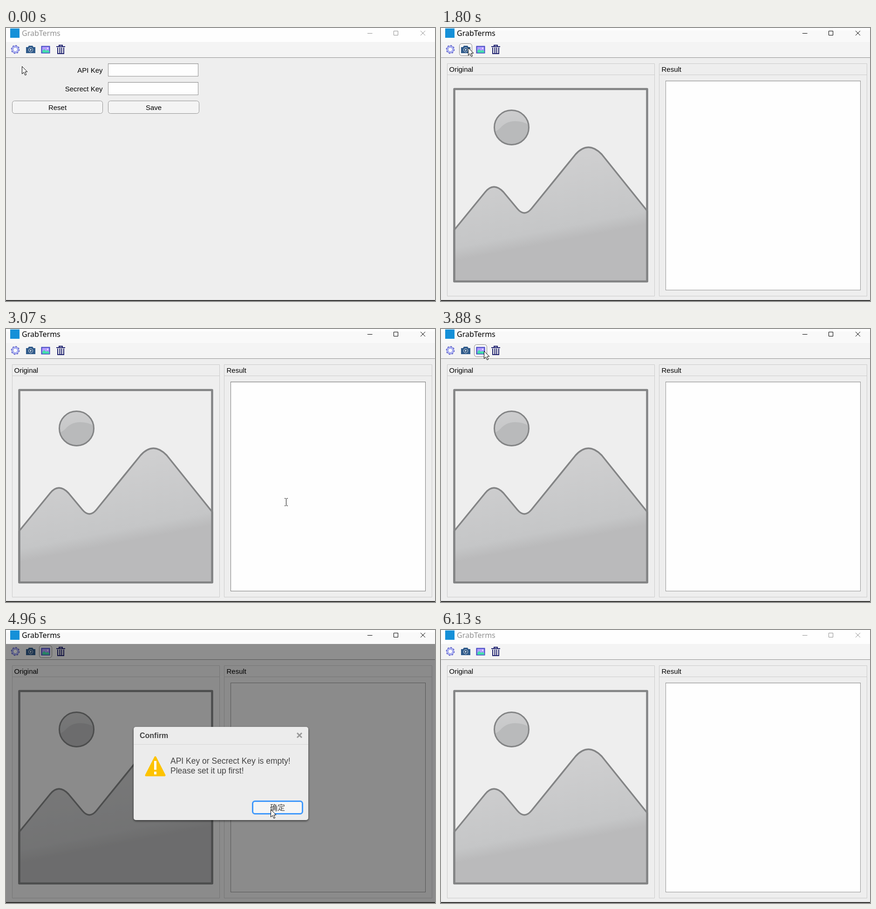
Animation of 921x586 px, one loop 6230 ms. Source, as an HTML page:

```html
<!DOCTYPE html>
<html lang="en">
<head>
<meta charset="utf-8">
<title>GrabTerms</title>
<style>
  html, body { margin: 0; width: 100%; height: 100%; overflow: hidden; background: #eee; }
  svg { position: fixed; inset: 0; width: 100%; height: 100%; font: 15px "Liberation Sans", Arial, sans-serif; }
  .right { text-anchor: end; }
  .center { text-anchor: middle; }
  .panel { fill: none; stroke: #cbcbcb; }
  .field { fill: #fefefe; stroke: #949494; }
  .button { fill: #f4f4f4; stroke: #949494; }
  .inset { stroke: #e2e2e2; }
  .outline { stroke: #838485; stroke-linejoin: round; }
  #dialog { fill: #444; }
</style>
</head>
<body>
<svg viewBox="0 0 921 586">
  <defs>
    <linearGradient id="slope" gradientUnits="userSpaceOnUse" x1="200" y1="291" x2="235" y2="474">
      <stop offset="0" stop-color="#cfcfd0"/>
      <stop offset=".78" stop-color="#c5c6c7"/>
      <stop offset=".93" stop-color="#bababb"/>
    </linearGradient>
    <linearGradient id="disc" x2=".15" y2="1">
      <stop offset="0" stop-color="#cececf"/>
      <stop offset=".65" stop-color="#c6c7c8"/>
    </linearGradient>
    <filter id="shadow" x="-10%" y="-10%" width="120%" height="125%">
      <feDropShadow dx="0" dy="2" stdDeviation="2" flood-opacity=".6"/>
    </filter>
    <g id="input">
      <rect class="field" x="219.5" y="76.5" width="193" height="27"/>
      <path class="inset" d="M220 77.5h192"/>
    </g>
    <path id="cross" d="M-5-5L5 5M5-5L-5 5"/>
  </defs>

  <rect width="921" height="586" fill="#eee"/>

  <!-- title bar -->
  <rect width="921" height="30" fill="#fefefe"/>
  <rect id="activeBar" y="5" width="921" height="25" fill="#f9f9f9"/>
  <rect x="9" y="1" width="20" height="20" fill="#1590d8"/>
  <g id="title" fill="currentColor">
    <text x="34" y="17" style="font:16px 'Noto Sans','Open Sans',sans-serif">GrabTerms</text>
    <g fill="none" stroke="currentColor">
      <path d="M776 11.5h10.5M832.5 6.5h9v9h-9z"/>
      <use href="#cross" x="895" y="11"/>
    </g>
  </g>

  <!-- toolbar -->
  <rect y="30" width="921" height="33" fill="#f4f4f4"/>
  <path d="M0 63.5h921" stroke="#909090"/>
  <rect id="hover" y="33.5" width="27" height="26" rx="5" fill="#f7f7f7" stroke="#858585"/>
  <g fill="none">
    <circle cx="20" cy="46" r="8.3" stroke="#686bcd" stroke-width="2.2" stroke-dasharray="3.26"/>
    <circle cx="20" cy="46" r="6.1" fill="#fff" stroke="#686bcd" stroke-width="3.8"/>
    <circle cx="20" cy="46" r="6" stroke="#bec5ff" stroke-width="2.2"/>
  </g>
  <path d="M43 41h4l2-3h8l2 3h4v13h-20z" fill="#305b8b"/>
  <circle cx="53" cy="46.8" r="4.5" fill="#244b79" stroke="#e7eff6"/>
  <path d="M51.5 44.3l4 2.5-4 2.5z" fill="#dceaf4"/>
  <rect x="76.5" y="39.5" width="17" height="14" fill="#b39cff" stroke="#4147c2" stroke-width="2"/>
  <path d="M78 49l4-4 4 4 3-2 4 3v3H78z" fill="#43dfac"/>
  <circle cx="89.5" cy="43.5" r="1.5" fill="#f4eaff"/>
  <path d="M108 40h19M114 39v-2h7v2M111 42v13h13V42M115.5 42v12M119.5 42v12" fill="none" stroke="#20236f" stroke-width="2"/>

  <g id="settings">
    <g class="right"><text x="207.5" y="96">API Key</text><text x="207.5" y="136">Secrect Key</text></g>
    <use href="#input"/>
    <use href="#input" y="40"/>
    <rect id="reset" class="button" x="13.5" y="156.5" width="194" height="27" rx="5"/>
    <rect class="button" x="219.5" y="156.5" width="195" height="27" rx="5"/>
    <g class="center"><text x="110.5" y="176">Reset</text><text x="317" y="176">Save</text></g>
  </g>

  <g id="main">
    <path class="panel" d="M13.5 76.5h445v499h-445zM13.5 100.5h445M468.5 76.5h446v499h-446zM468.5 100.5h446"/>
    <text x="17.5" y="94">Original</text>
    <text x="473.5" y="94">Result</text>
    <rect id="result" class="field" x="482.5" y="113.5" width="418" height="449"/>
    <path id="resultInset" class="inset" d="M483 114.5h417"/>
    <path d="M28 434L95 352Q113 330 134 352L164 388Q179 406 194 388L289 271Q316 241 345 271L443 393V544H28z" fill="url(#slope)" class="outline" stroke-width="3.5"/>
    <circle cx="151.5" cy="213.5" r="37" fill="url(#disc)"/>
    <path d="M115 221C128 222 130 200 159 200Q177 200 188 208A37 37 0 0 1 115 221z" fill="#b9babb"/>
    <circle cx="151.5" cy="213.5" r="37" fill="none" class="outline" stroke-width="3"/>
    <rect x="28.5" y="131" width="414" height="413" fill="none" class="outline" stroke-width="4.5"/>
  </g>

  <rect y="584" width="921" height="2" fill="#2b2b29"/>

  <g id="dialog">
    <rect y="30" width="921" height="554" fill="#000" opacity=".42"/>
    <rect x="274" y="208" width="375" height="200" rx="5" fill="#ececec" filter="url(#shadow)"/>
    <path d="M274 245.5h375" stroke="#d7d7d7"/>
    <text x="287" y="232" font-size="16" font-weight="bold">Confirm</text>
    <use href="#cross" x="630" y="226" stroke="#999" stroke-width="3"/>
    <path d="M320.5 273L340.500 312H300.5z" fill="#fdc300" stroke="#fdc300" stroke-width="4" stroke-linejoin="round"/>
    <path d="M320.5 281v19M320.5 304v6" stroke="#fff" stroke-width="5"/>
    <g font-size="17.5">
      <text x="353" y="287">API Key or Secrect Key is empty!</text>
      <text x="353" y="308">Please set it up first!</text>
    </g>
    <rect x="529.5" y="367.5" width="107" height="27" rx="5" fill="#f5f5f5" stroke="#3f98fb" stroke-width="3"/>
    <text class="center" x="583" y="387" style="font:16px 'Noto Sans CJK SC','Noto Sans CJK',sans-serif">确定</text>
  </g>

  <path id="arrow" d="M.5 .5V16.5L4.2 13 7 19.3 9.6 18.2 6.9 12H11.8z" fill="#fff" stroke="#000"/>
  <path id="beam" d="M-3-7.5h2.5M1.5-7.5h2.5M-3 8.5h2.5M1.5 8.5h2.5M.5-7v15" fill="none" stroke="#111"/>
</svg>
<script>
const LOOP = 6230, STEP = 90;
const el = id => document.getElementById(id);
const show = (id, on) => el(id).style.display = on ? "" : "none";
const within = (v, from, to) => v >= from && v < to;

// The pointer glides from stop to stop and rests from arrive to leave.
const stop = (x, y, arrive, leave = arrive) => ({ x, y, arrive, leave });
const stops = [
  stop(34, 82, 0),
  stop(115, 218, 315),
  stop(12, 69, 630),
  stop(22, 46, 810, 1080),     // settings tool
  stop(152, 83, 1620),
  stop(58, 42, 1800, 2260),    // camera tool
  stop(601, 371, 2800, 3070),  // confirm button
  stop(204, 82, 3250),
  stop(92, 47, 3600, 3970),    // picture tool
  stop(568, 385, 4700, 5140),  // confirm button
  stop(901, 582, 5770)
];

function pointerAt(t) {
  const i = stops.findLastIndex(s => s.arrive <= t);
  const from = stops[i], to = stops[i + 1] ?? from;
  const k = t <= from.leave || to === from ? 0 : (t - from.leave) / (to.arrive - from.leave);
  const ease = k * k * (3 - 2 * k);
  const mix = axis => Math.round(from[axis] + (to[axis] - from[axis]) * ease);
  return [mix("x"), mix("y")];
}

// The screen updates every 90 ms, with one longer hold before 2080 ms.
function sample(t) {
  const base = t < 2080 ? 0 : 2080;
  return base + Math.floor((t - base) / STEP) * STEP;
}

function draw(time) {
  const t = sample(time);
  const [x, y] = pointerAt(t);
  const over = (left, top, width, height) => within(x, left, left + width) && within(y, top, top + height);
  const inMain = t >= 1080;
  const active = inMain && time < 6130;
  const dialog = within(t, 2170, 2980) || within(t, 3970, 5050);
  const visible = t < 5860;

  show("settings", !inMain);
  show("main", inMain);
  show("activeBar", active);
  show("dialog", dialog);
  el("title").style.color = active ? "#000" : "#929292";
  el("reset").style.fill = over(13, 156, 195, 28) ? "#fafafa" : "";

  // The I-beam appears once the pointer moves after the second dialog closes.
  const overResult = inMain && !dialog && visible && !within(t, 5050, 5230) && over(482, 113, 419, 450);
  el("result").style.fill = dialog ? "#eee" : "";
  el("result").style.stroke = overResult ? "#7c7c7c" : "";
  show("resultInset", !dialog);

  // A dialog keeps the highlight of the tool that opened it.
  const tool = dialog ? (t < 3970 ? 1 : 2) : [0, 1, 2].find(i => over(6 + i * 32.5, 33, 28, 27));
  show("hover", tool !== undefined);
  if (tool !== undefined) el("hover").setAttribute("x", Math.floor(6 + tool * 32.5) + .5 + (tool === 1));

  show("arrow", visible && !overResult);
  show("beam", overResult);
  for (const id of ["arrow", "beam"]) el(id).setAttribute("transform", `translate(${x} ${y})`);
}

const start = performance.now();
function tick() {
  draw((performance.now() - start) % LOOP);
  requestAnimationFrame(tick);
}
tick();
</script>
</body>
</html>
```
